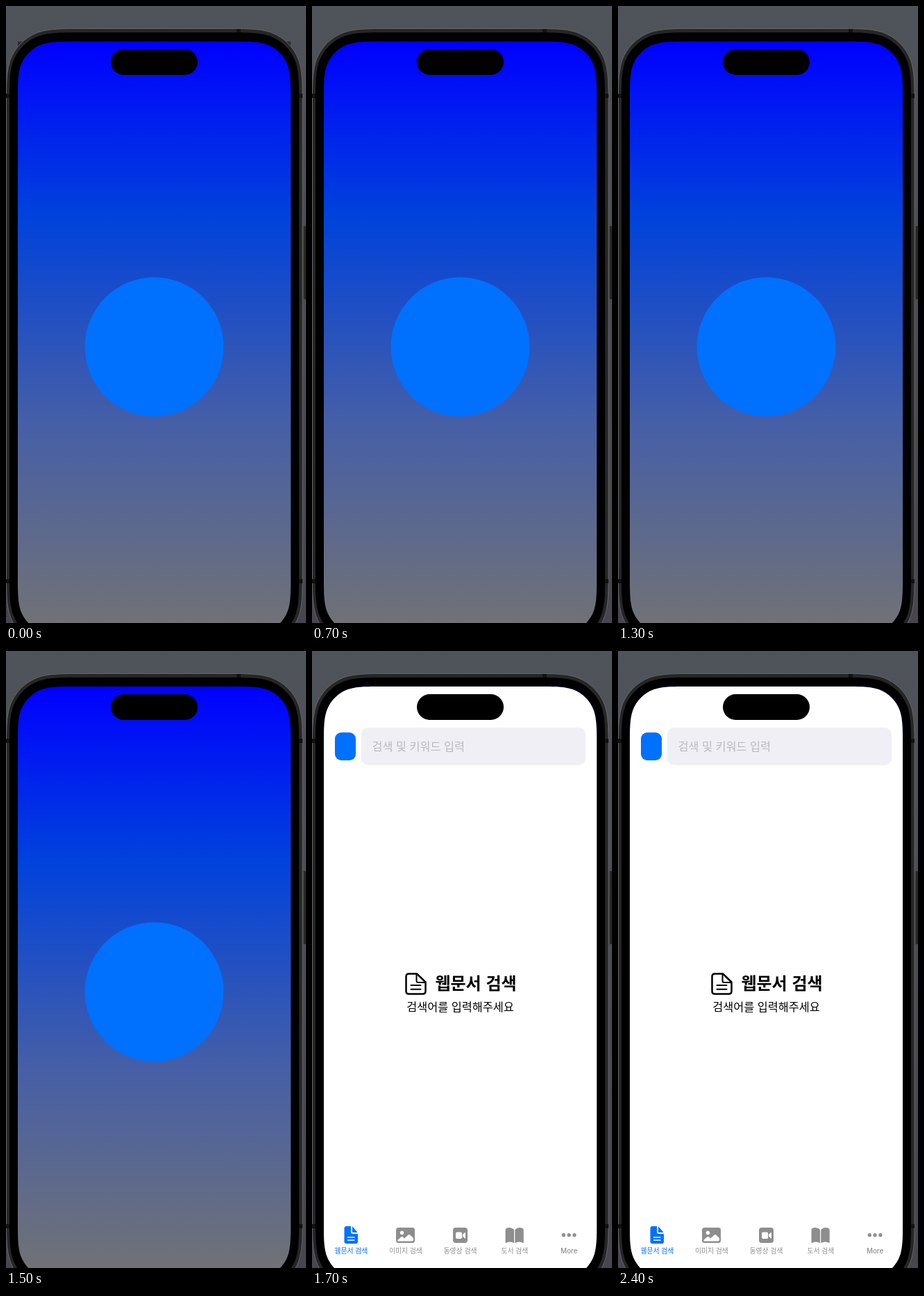
These frames come from a looping animation (432x886 px, 2.8 s). An HTML page:

```html
<!DOCTYPE html>
<html lang="ko">
<head>
<meta charset="utf-8">
<title>Search app launch</title>
<style>
  html, body { margin: 0; width: 100%; height: 100%; overflow: hidden; background: #4d5057; }
  svg { display: block; width: 432px; height: 886px; }
  text { font-family: "Noto Sans CJK KR", "Noto Sans CJK", "Noto Sans", sans-serif; }
  .mid { text-anchor: middle; }
  .tabs text { font-size: 9.8px; font-weight: 500; text-anchor: middle; }
  .tabs .latin { font-family: Inter, sans-serif; }
  .corners { animation: corners 2800ms step-end infinite; }
  .app { animation: app 2800ms step-end infinite; }
  @keyframes corners { 0% { opacity: 1; } 3.5714% { opacity: 0; } 100% { opacity: 0; } }
  @keyframes app { 0% { opacity: 0; } 57.1428% { opacity: 1; } 100% { opacity: 1; } }
</style>
</head>
<body>
<svg viewBox="0 0 432 886" xmlns="http://www.w3.org/2000/svg">
  <defs>
    <linearGradient id="wall" x2="0" y2="1">
      <stop stop-color="#4f535a"/>
      <stop offset=".5" stop-color="#4a4c53"/>
      <stop offset="1" stop-color="#48454f"/>
    </linearGradient>
    <linearGradient id="splash" gradientUnits="userSpaceOnUse" x1="0" y1="51" x2="0" y2="903">
      <stop stop-color="#00f"/>
      <stop offset=".292" stop-color="#0042dc"/>
      <stop offset=".645" stop-color="#465fa6"/>
      <stop offset="1" stop-color="#737373"/>
    </linearGradient>
    <clipPath id="screen"><path data-box="17 51 393 852 55"/></clipPath>
  </defs>

  <rect width="432" height="886" fill="url(#wall)"/>
  <rect class="corners" x="17" y="51" width="393" height="835" fill="#2b2d31"/>

  <!-- phone body -->
  <rect x="428.5" y="316" width="4" height="105" fill="#2a2725"/>
  <path data-box="0.5 32.5 426.5 889 72" fill="#262626" stroke="#65676a"/>
  <g fill="#111">
    <rect x="332" y="33" width="6" height="6"/>
    <rect y="126" width="5" height="6"/>
    <rect y="823" width="5" height="6"/>
    <rect x="422" y="126" width="5" height="6"/>
    <rect x="422" y="823" width="5" height="6"/>
  </g>
  <path data-box="5 38 417 878 67"/>

  <g clip-path="url(#screen)">
    <!-- launch screen -->
    <rect x="17" y="51" width="393" height="852" fill="url(#splash)"/>
    <circle cx="213.5" cy="489.5" r="100" fill="#0070ff"/>

    <!-- search screen -->
    <g class="app">
      <rect x="17" y="51" width="393" height="852" fill="#fff"/>
      <rect x="33" y="117" width="30" height="40" rx="9" fill="#0070ff"/>
      <rect x="71" y="110" width="323" height="54" rx="10" fill="#efeff5"/>
      <text x="86.5" y="143" font-size="16.3" fill="#b9b9be">검색 및 키워드 입력</text>

      <g fill="none" stroke="#000" stroke-width="2.5" stroke-linecap="round" stroke-linejoin="round">
        <path d="M139.5 463.5H151L163.5 475.5V488.5Q163.5 492.5 159.5 492.5H139.5Q135.5 492.5 135.5 488.5V467.5Q135.5 463.5 139.5 463.5Z"/>
        <path d="M150.5 464V473.5Q150.5 476 153 476H163" stroke-width="2"/>
        <path d="M142.5 480H156.5M142.5 485.7H156.5" stroke-width="2"/>
      </g>
      <text class="mid" x="236" y="486" font-size="24" font-weight="700">웹문서 검색</text>
      <text class="mid" x="213.5" y="517" font-size="16.3">검색어를 입력해주세요</text>

      <g class="tabs" fill="#8e8e8e">
        <g fill="#0070ff">
          <path d="M49.5 826H56V834Q56 837 59 837H66V848Q66 851 63 851H49.5Q46.5 851 46.5 848V829Q46.5 826 49.5 826ZM58 826.3L65.7 835H59Q58 835 58 834Z"/>
          <path d="M51.5 842H61M51.5 846H61" stroke="#fff" stroke-width="1.5" stroke-linecap="round"/>
          <text x="56.3" y="865">웹문서 검색</text>
        </g>

        <rect x="121" y="828" width="27" height="22" rx="3.5"/>
        <circle cx="129.5" cy="835.5" r="2.7" fill="#fff"/>
        <path d="M123.5 847V845.5L128.5 841.2Q129.5 840.5 130.5 841.2L133 843.4L138.5 838.4Q139.8 837.4 141 838.4L146 843V845.5Q146 847.5 144 847.5H124Z" fill="#fff"/>
        <text x="134.9" y="865">이미지 검색</text>

        <rect x="203" y="828" width="21" height="22" rx="4"/>
        <rect x="207" y="834.5" width="9" height="9.5" rx="1.8" fill="#fff"/>
        <path d="M217 837.8L220.3 835Q221 834.6 221 835.5V843Q221 843.9 220.3 843.5L217 840.8Z" fill="#fff"/>
        <text x="213.5" y="865">동영상 검색</text>

        <path id="page" d="M291 831Q288 828 284.5 828Q278.5 828 278.5 831.5V849Q278.5 850.3 280 849.8Q285.5 847 291 850.3Z"/>
        <use href="#page" transform="matrix(-1 0 0 1 583.2 0)"/>
        <text x="291.8" y="865">도서 검색</text>

        <circle cx="362.3" cy="838.7" r="2.6"/>
        <circle cx="370.1" cy="838.7" r="2.6"/>
        <circle cx="377.9" cy="838.7" r="2.6"/>
        <text class="latin" x="370.1" y="865">More</text>
      </g>
    </g>
  </g>
  <rect x="151" y="62" width="125" height="37" rx="18.5"/>
</svg>
<script>
  // Rounded rectangle with continuous-curvature corners.
  const curve = [[1.5287, 0], [1.0885, 0], [.8684, 0], [.6315, .0749], [.3728, .1691],
                 [.1691, .3728], [.0749, .6315], [0, .8684], [0, 1.0885], [0, 1.5287]];

  function smoothBox(x, y, w, h, r) {
    const corner = (right, bottom) => {
      const pts = curve.map(([u, v]) => [
        right ? x + w - u * r : x + u * r,
        bottom ? y + h - v * r : y + v * r
      ]);
      if (right !== bottom) pts.reverse();
      return pts[0] + "C" + pts.slice(1).join(" ");
    };
    // Counter-clockwise from the top edge.
    return "M" + corner(false, false) + "L" + corner(false, true) +
           "L" + corner(true, true) + "L" + corner(true, false) + "Z";
  }

  for (const path of document.querySelectorAll("[data-box]")) {
    path.setAttribute("d", smoothBox(...path.dataset.box.split(" ").map(Number)));
  }
</script>
</body>
</html>
```
